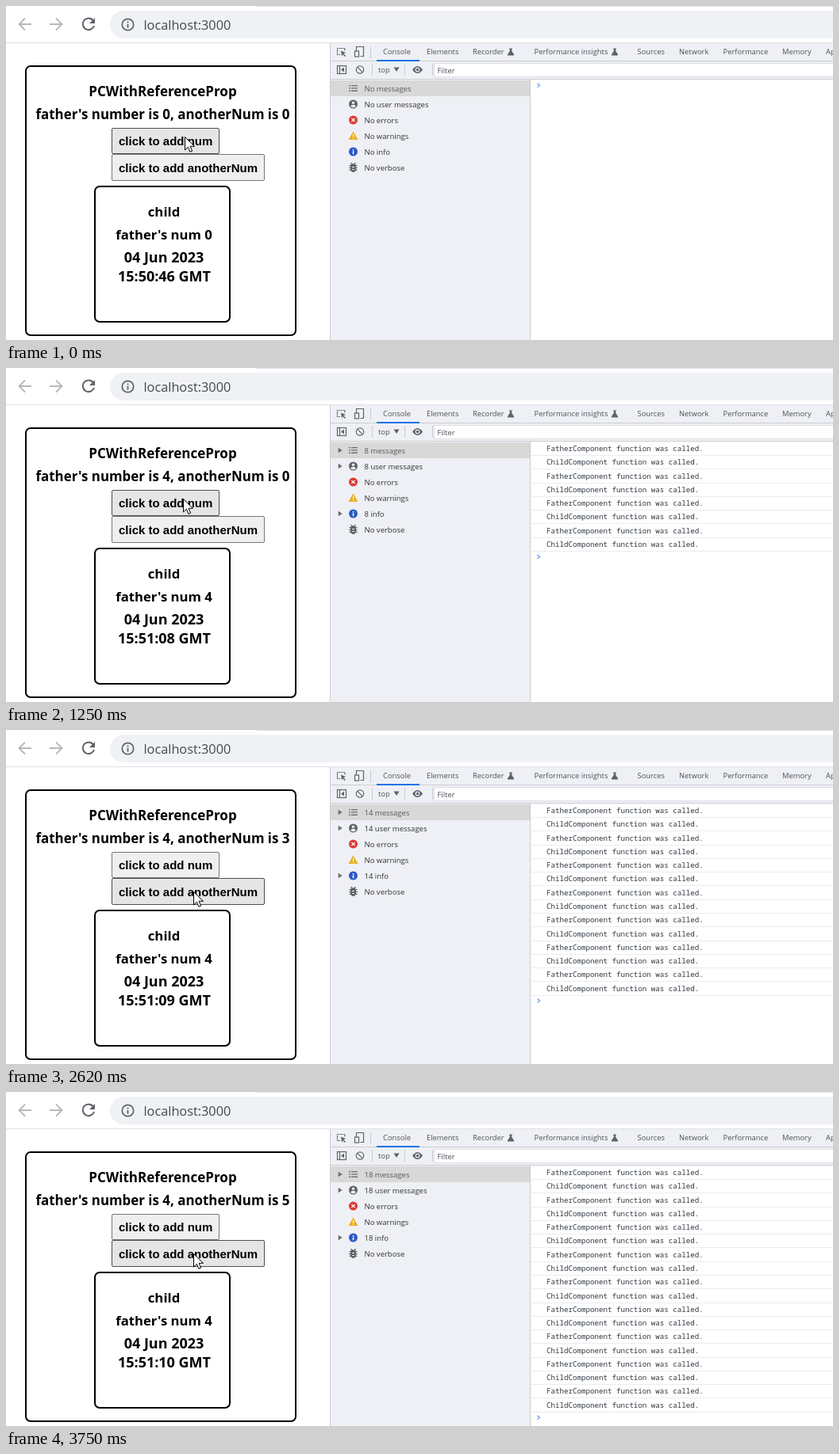
An HTML page that plays this animation: 1042 by 422 pixels, repeating every 3.88 s.

```html
<!DOCTYPE html>
<html lang="en">
<head>
<meta charset="utf-8">
<title>Reference prop demo</title>
<style>
  html, body { margin: 0; width: 100%; height: 100%; overflow: hidden; background: #fff; }
  svg { display: block; width: 1042px; height: 422px; }
  text { white-space: pre; }
  .page { font: bold 17px "Open Sans", "Noto Sans", sans-serif; text-anchor: middle; fill: #000; }
  .btn { font: bold 15px "Liberation Sans", Arial, sans-serif; fill: #000; }
  .url { font: 16.3px "Open Sans", "Noto Sans", sans-serif; fill: #45494d; }
  .ui { font: 9.4px "Open Sans", "Noto Sans", sans-serif; fill: #4d5156; }
  .side { font: 9.5px "Open Sans", "Noto Sans", sans-serif; fill: #303336; }
  .log { font: 9.17px "Noto Sans Mono", "DejaVu Sans Mono", monospace; fill: #303942; }
  .line { fill: none; stroke: #5f6368; }
</style>
</head>
<body>
<svg id="stage" viewBox="0 0 1042 422">
  <defs>
    <path id="flask" d="M-2-4.5h4v1h-.8v2.2L4 3.2q.6 1.3-.8 1.3h-6.4q-1.4 0-.8-1.3l2.8-4.5v-2.2h-.8z" fill="#5f6368"/>
    <path id="tri" d="M-2.3-3.2 2.7 0l-5 3.2z" fill="#6e6e6e"/>
  </defs>

  <!-- browser bar -->
  <path d="M315 0H1042V1H317z" fill="#dee1e6"/>
  <path d="M1042 6H148.500a17.500 17.500 0 0 0 0 35H1042z" fill="#eff1f5"/>
  <g fill="none" stroke="#b5b8bb" stroke-width="1.8">
    <path d="M32 23H16.500M24 15.500 16.500 23l7.500 7.500"/>
    <path d="M55 23h15.500M63 15.500l7.500 7.500-7.500 7.500"/>
  </g>
  <path class="line" stroke-width="2" d="M109.800 18.200A7.300 7.300 0 1 0 111 25"/>
  <path d="M112 15v7h-7z" fill="#5f6368"/>
  <circle class="line" cx="153.500" cy="23.500" r="7.200" stroke-width="1.7"/>
  <path d="M152.600 19.500h1.800v1.800h-1.800zM152.600 22.700h1.800v4.800h-1.800z" fill="#5f6368"/>
  <text class="url" x="173.500" y="29.500">localhost:3000</text>
  <path d="M0 46h1042v1H0z" fill="#dfe1e5"/>

  <!-- page -->
  <g fill="#fff" stroke="#000" stroke-width="2">
    <rect x="25" y="76" width="340" height="340" rx="6"/>
    <rect x="112" y="228" width="170" height="171" rx="6"/>
  </g>
  <g id="page"></g>
  <rect id="btn0" x="133.500" y="154.500" width="135" height="32" rx="1.500"/>
  <rect id="btn1" x="133.500" y="187.500" width="192" height="33" rx="1.500"/>
  <text class="btn" x="142" y="176">click to add num</text>
  <text class="btn" x="142" y="210">click to add anotherNum</text>

  <!-- developer tools frame -->
  <path d="M409 47h633v45H409zM409 92h251v330H409z" fill="#eff0f5"/>
  <path d="M409 94h251v20H409z" fill="#d8d8d8"/>
  <path d="M540 72h502v17H540z" fill="#fff"/>
  <path d="M408 47h1v375h-1zM409 69h633v1H409zM409 92h633v1H409zM660 93h1v329h-1z" fill="#cacdd1"/>
  <path d="M459 51h1v15h-1zM461 73h1v15h-1zM502 73h1v15h-1zM537 73h1v15h-1z" fill="#c9ccd1"/>
  <path d="M539.500 89.500v-17H1042M539.500 89.500H1042" fill="none" stroke="#dcdee3"/>
  <path d="M467 68h54v2h-54z" fill="#1a73e8"/>

  <!-- toolbar icons -->
  <g class="line" stroke-width="1.200">
    <path d="M421 61.500h-3.500v-8h9.500v3.500" stroke-dasharray="2 .7"/>
    <path d="M441.500 57v-5.500h9v12h-4"/>
    <rect x="439.500" y="57" width="5" height="7" fill="#eff0f5"/>
    <rect x="417.500" y="75.500" width="11" height="10"/>
    <path d="M420.500 75.500v10"/>
    <circle cx="446" cy="80.500" r="4.700"/>
    <path d="M442.700 77.200l6.600 6.600"/>
  </g>
  <path d="M422 56.500 428 59l-2.600 1.200 2.600 2.700-1 1-2.700-2.700-1.100 2.600zM426 77.500v6l-4-3z" fill="#5f6368"/>
  <path d="M488.500 77.500h7l-3.500 5.500z" fill="#5f6368"/>
  <path d="M512 80.500q6.500-9 13 0q-6.500 9-13 0z" fill="#5f6368"/>
  <circle cx="518.500" cy="80.500" r="2.300" fill="#5f6368" stroke="#eff0f5" stroke-width="1.200"/>
  <use href="#flask" x="636" y="58"/>
  <use href="#flask" x="767" y="58"/>
  <g id="tools"></g>

  <!-- sidebar icons -->
  <path d="M432 100h2v1.300h-2zm3 0h8v1.300h-8zm-3 3.300h2v1.300h-2zm3 0h8v1.300h-8zm-3 3.300h2v1.300h-2zm3 0h8v1.300h-8z" fill="#6e6e6e"/>
  <g fill="#5f6368">
    <circle cx="437.500" cy="124" r="5.500"/>
    <path d="M435 199.500h5l1 2.500v5q-1 3-3.500 3t-3.500-3v-5z"/>
    <path class="line" stroke-width="1.200" d="M432.500 201.700h10M432 204.500h11M432.500 207.400h10M434.500 198.200l2 2M440.500 198.200l-2 2"/>
  </g>
  <path d="M436 203h3v1h-3zM436 206h3v1h-3z" fill="#eff0f5"/>
  <g fill="#eff0f5">
    <circle cx="437.500" cy="122.200" r="1.700"/>
    <path d="M434.200 127q.5-2.200 3.300-2.200t3.300 2.200q-3.300 2.500-6.600 0z"/>
  </g>
  <circle cx="437.500" cy="144" r="5.500" fill="#dc3a35"/>
  <path d="M435.400 141.900l4.200 4.200M439.600 141.900l-4.200 4.200" stroke="#fff" stroke-width="1.300"/>
  <path d="M437.500 158.500 443.500 169h-12z" fill="#e8b020"/>
  <path d="M437 162h1.200v3.500H437zM437 166.500h1.200v1.200H437z" fill="#fff"/>
  <circle cx="437.500" cy="184" r="5.500" fill="#2b57c8"/>
  <path d="M436.800 181h1.500v1.500h-1.500zM436.800 183.300h1.500v4h-1.500z" fill="#fff"/>
  <g id="arrows">
    <use href="#tri" x="421" y="104"/>
    <use href="#tri" x="421" y="124"/>
    <use href="#tri" x="421" y="184"/>
  </g>
  <g id="side"></g>

  <!-- console -->
  <g id="logs"></g>
  <path id="prompt" d="M669.500-2.500l3 2.500-3 2.500" fill="none" stroke="#6ea0ee" stroke-width="1.300"/>

  <path id="cursor" d="M0 0V16.500l3.900-3.700 2.500 6 2.700-1.100-2.500-5.900H12z" fill="#fff" stroke="#000" stroke-linejoin="round"/>
</svg>
<script>
const LOOP = 3880, ROW = 17.28, TOP = 92.7;
const $ = id => document.getElementById(id);

function add(parent, tag, attrs, text = '') {
  const el = document.createElementNS('http://www.w3.org/2000/svg', tag);
  for (const key in attrs) el.setAttribute(key, attrs[key]);
  el.textContent = text;
  return $(parent).appendChild(el);
}

// page headings: centre, baseline, size, text
const heads = [
  [197.5, 114, 17, 'PCWithReferenceProp'],
  [197.5, 143, 16.9, ''],
  [199, 266, 16.8, 'child'],
  [199, 295, 16.7, ''],
  [199, 324, 18, '04 Jun 2023'],
  [199.5, 348, 18, '']
].map(([x, y, size, text]) =>
  add('page', 'text', { class: 'page', x, y, style: `font-size:${size}px` }, text));

[[475, 'Console'], [530, 'Elements'], [588, 'Recorder'], [665.5, 'Performance insights'],
 [795.5, 'Sources'], [848, 'Network'], [903.5, 'Performance'], [978, 'Memory'], [1033, 'Application']]
  .forEach(([x, text]) => add('tools', 'text', { class: 'ui', x, y: 61.3 }, text));
add('tools', 'text', { class: 'ui', x: 469, y: 84 }, 'top');
add('tools', 'text', { class: 'ui', x: 543.5, y: 84.7 }, 'Filter');

const kinds = ['messages', 'user messages', 'errors', 'warnings', 'info', 'verbose'];
const side = kinds.map((k, i) => add('side', 'text', { class: 'side', x: 451.5, y: 108 + 20 * i }));
side[0].style.fill = '#55585c';

const logs = Array.from({ length: 18 }, (_, i) => {
  const row = add('logs', 'g', {});
  row.id = 'log' + i;
  const y = TOP + ROW * i;
  add(row.id, 'text', { class: 'log', x: 681, y: (y + 12.3).toFixed(2) },
    `${i % 2 ? 'Child' : 'Father'}Component function was called.`);
  add(row.id, 'rect', { x: 661, y: Math.round(y + ROW), width: 381, height: 1, fill: '#ececef' });
  return row;
});

// start time, num, anotherNum, clock
const clicks = [
  [0, 0, 0, '15:50:46'],
  [370, 1, 0, '15:51:07'],
  [620, 2, 0, '15:51:07'],
  [870, 3, 0, '15:51:08'],
  [1120, 4, 0, '15:51:08'],
  [2000, 4, 1, '15:51:09'],
  [2250, 4, 2, '15:51:09'],
  [2500, 4, 3, '15:51:09'],
  [2750, 4, 4, '15:51:09'],
  [3250, 4, 5, '15:51:10']
];
// start time, pointer x, y
const moves = [
  [0, 225.5, 165.5], [120, 223.5, 165.5], [1370, 226.5, 173.5],
  [1500, 233.5, 195.5], [1620, 236.5, 204.5]
];
const at = (table, t) => table.findLast(step => step[0] <= t);

function paintButton(id, hover) {
  $(id).setAttribute('fill', hover ? '#e5e5e5' : '#efefef');
  $(id).setAttribute('stroke', hover ? '#4f4f4f' : '#767676');
}

function showClick([, num, other, clock]) {
  const count = 2 * (num + other);
  heads[1].textContent = `father's number is ${num}, anotherNum is ${other}`;
  heads[3].textContent = `father's num ${num}`;
  heads[5].textContent = `${clock} GMT`;
  kinds.forEach((kind, i) => {
    const counted = count && [0, 1, 4].includes(i);
    side[i].textContent = `${counted ? count : 'No'} ${kind}`;
  });
  $('arrows').style.display = count ? '' : 'none';
  logs.forEach((row, i) => row.style.display = i < count ? '' : 'none');
  $('prompt').setAttribute('transform', `translate(0 ${TOP + ROW * count + 7.5})`);
}

function showMove([, x, y]) {
  $('cursor').setAttribute('transform', `translate(${x} ${y})`);
  paintButton('btn0', y < 187);
  paintButton('btn1', y >= 187);
}

const start = performance.now();
let click, move;
function frame() {
  const t = (performance.now() - start) % LOOP;
  const c = at(clicks, t), m = at(moves, t);
  if (c !== click) showClick(click = c);
  if (m !== move) showMove(move = m);
  requestAnimationFrame(frame);
}
frame();
</script>
</body>
</html>
```
